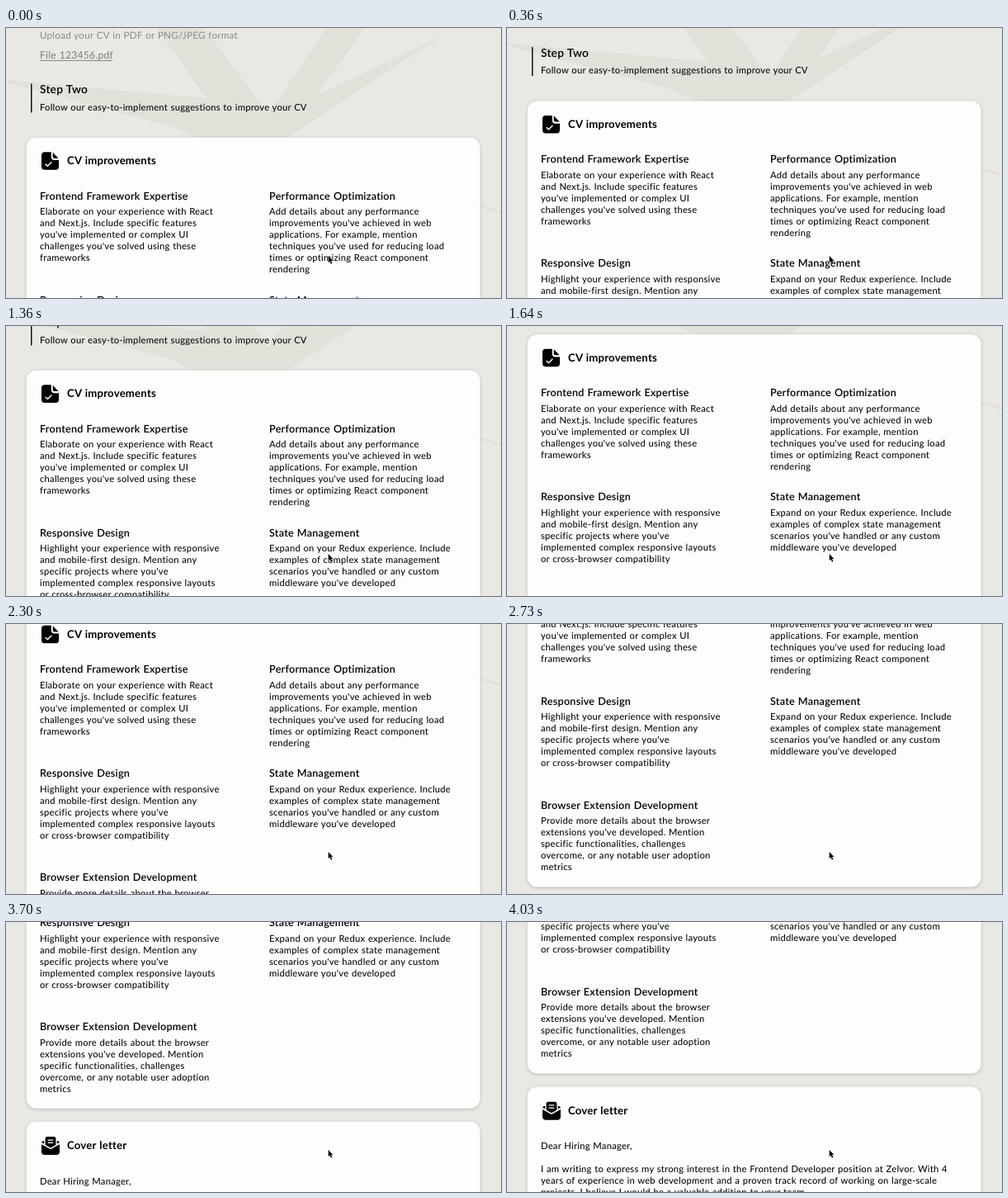
Recreate the animation shown at these times as an HTML page. Size 600 by 327 pixels, loop 4.06 s.

```html
<!DOCTYPE html>
<html lang="en">
<head>
<meta charset="utf-8">
<title>CV improvements</title>
<style>
  html, body { margin: 0; width: 100%; height: 100%; overflow: hidden; background: #e9e8e2; }
  svg { display: block; }
  text {
    font: 500 11.25px Lato, "Open Sans", sans-serif;
    letter-spacing: .2px; word-spacing: .5px; font-variant-ligatures: none;
    fill: #0c0c0c; text-rendering: geometricPrecision;
  }
  .title { font-size: 13.2px; font-weight: 700; fill: #000; }
  .head { font-size: 12.7px; font-weight: 600; fill: #000; }
  .step { font-size: 13.8px; font-weight: 600; fill: #000; }
  .note { font-size: 11.7px; font-weight: 400; fill: #8b8a86; }
  .file { font-size: 12.2px; fill: #858480; }
  .card { fill: #fdfdfd; filter: drop-shadow(0 1px 2px rgba(0, 0, 0, .2)); }
</style>
</head>
<body>
<svg width="600" height="327" viewBox="0 0 600 327">
  <rect width="600" height="327" fill="#e9e8e2"/>
  <g id="page">
    <!-- backdrop star -->
    <g fill="#e1e0d9">
      <path d="M0 63 L243 85 L183 0 H240 L318 104 L388 0 H435 L376 82 L530 9 L358 122 Q330 142 290 142 Q240 142 200 119 L0 66Z"/>
      <path d="M570 212 L600 221 V224.5 L570 215Z"/>
    </g>
    <rect x="30" y="67.5" width="1.5" height="35" fill="#111"/>
    <path d="M41 39.5H128.5" stroke="#858480"/>
    <rect class="card" x="24.8" y="132.8" width="549.8" height="421.7" rx="12"/>
    <rect class="card" x="24.8" y="570.5" width="549.8" height="300" rx="12"/>
    <!-- checked file -->
    <g transform="translate(43 150.3) scale(.98)">
      <path d="M4 0H12V6Q12 10 16 10H21.5V18Q21.5 22 17.5 22H4Q0 22 0 18V4Q0 0 4 0Z"/>
      <path d="M14 0.5L21 7.8H16Q14 7.8 14 5.8Z"/>
      <path d="M5.2 15.2L7.6 17.4L12.2 12.8" fill="none" stroke="#fff" stroke-width="1.5" stroke-linecap="round" stroke-linejoin="round"/>
    </g>
    <!-- open envelope -->
    <g transform="translate(43 588.7)">
      <path d="M3.2 5V8.5L0 7Q0.4 5.6 3.2 5ZM18.8 5V8.5L22 7Q21.6 5.6 18.8 5Z"/>
      <path d="M7 0H15Q17.4 0 17.4 2.4V10L11 13.6L4.6 10V2.4Q4.6 0 7 0Z"/>
      <path d="M0 9.2L11 15.4L22 9.2V18Q22 22 18 22H4Q0 22 0 18Z"/>
      <path d="M8.2 4.2H13.8M8.2 7.4H13.8" stroke="#fff" stroke-width="1.4" stroke-linecap="round"/>
    </g>
  </g>
  <path d="M390.7 276V284.2L392.5 282.6L393.9 285.8L395.4 285.1L394 282H396.4Z" stroke="#fff" stroke-width=".8" paint-order="stroke"/>
</svg>
<script>
const page = document.getElementById("page");

function write(x, y, str, cls = "") {
  const el = document.createElementNS("http://www.w3.org/2000/svg", "text");
  el.setAttribute("x", x);
  el.setAttribute("y", y);
  el.setAttribute("class", cls);
  el.textContent = str;
  page.append(el);
}

function lines(x, y, rows) {
  rows.forEach((row, i) => write(x, y + i * 14, row));
}

function tip(x, y, head, rows) {
  write(x, y, head, "head");
  lines(x, y + 18.6, rows);
}

write(41, 13.6, "Upload your CV in PDF or PNG/JPEG format", "note");
write(41, 37, "File 123456.pdf", "file");
write(41, 79.3, "Step Two", "step");
write(41, 99.8, "Follow our easy-to-implement suggestions to improve your CV");
write(74, 165.3, "CV improvements", "title");

tip(41, 207.8, "Frontend Framework Expertise", [
  "Elaborate on your experience with React",
  "and Next.js. Include specific features",
  "you've implemented or complex UI",
  "challenges you've solved using these",
  "frameworks"
]);
tip(319, 207.8, "Performance Optimization", [
  "Add details about any performance",
  "improvements you've achieved in web",
  "applications. For example, mention",
  "techniques you've used for reducing load",
  "times or optimizing React component",
  "rendering"
]);
tip(41, 333.8, "Responsive Design", [
  "Highlight your experience with responsive",
  "and mobile-first design. Mention any",
  "specific projects where you've",
  "implemented complex responsive layouts",
  "or cross-browser compatibility"
]);
tip(319, 333.8, "State Management", [
  "Expand on your Redux experience. Include",
  "examples of complex state management",
  "scenarios you've handled or any custom",
  "middleware you've developed"
]);
tip(41, 459.8, "Browser Extension Development", [
  "Provide more details about the browser",
  "extensions you've developed. Mention",
  "specific functionalities, challenges",
  "overcome, or any notable user adoption",
  "metrics"
]);

write(74, 603.8, "Cover letter", "title");
write(41, 646.4, "Dear Hiring Manager,");
lines(41, 674.4, [
  "I am writing to express my strong interest in the Frontend Developer position at Zelvor. With 4",
  "years of experience in web development and a proven track record of working on large-scale",
  "projects, I believe I would be a valuable addition to your team."
]);

// Scroll gestures as [time, offset], joined by a monotone cubic.
const LOOP = 4060;
const keys = [
  [0, 0], [510, 52], [1000, 52], [1030, 53], [1120, 55], [1640, 122.5],
  [1790, 147.5], [2270, 147.5], [2300, 148.5], [2730, 236], [3090, 262],
  [3210, 262], [3240, 263], [3360, 270], [4030, 371], [LOOP, 371]
];
const rate = i => (keys[i + 1][1] - keys[i][1]) / (keys[i + 1][0] - keys[i][0]);

function slope(i) {
  if (i === 0) return rate(0);
  if (i === keys.length - 1) return 0;
  const a = rate(i - 1), b = rate(i);
  return a * b > 0 ? 2 * a * b / (a + b) : 0;
}

function scrollAt(t) {
  let i = 0;
  while (i < keys.length - 2 && t >= keys[i + 1][0]) i++;
  const [t0, y0] = keys[i], [t1, y1] = keys[i + 1];
  const d = t1 - t0, u = (t - t0) / d, v = 1 - u;
  return y0 * v * v * (1 + 2 * u) + y1 * u * u * (3 - 2 * u)
    + d * u * v * (slope(i) * v - slope(i + 1) * u);
}

function draw() {
  const y = scrollAt(performance.now() % LOOP);
  page.setAttribute("transform", `translate(0 ${-y.toFixed(2)})`);
  requestAnimationFrame(draw);
}
draw();
</script>
</body>
</html>
```
